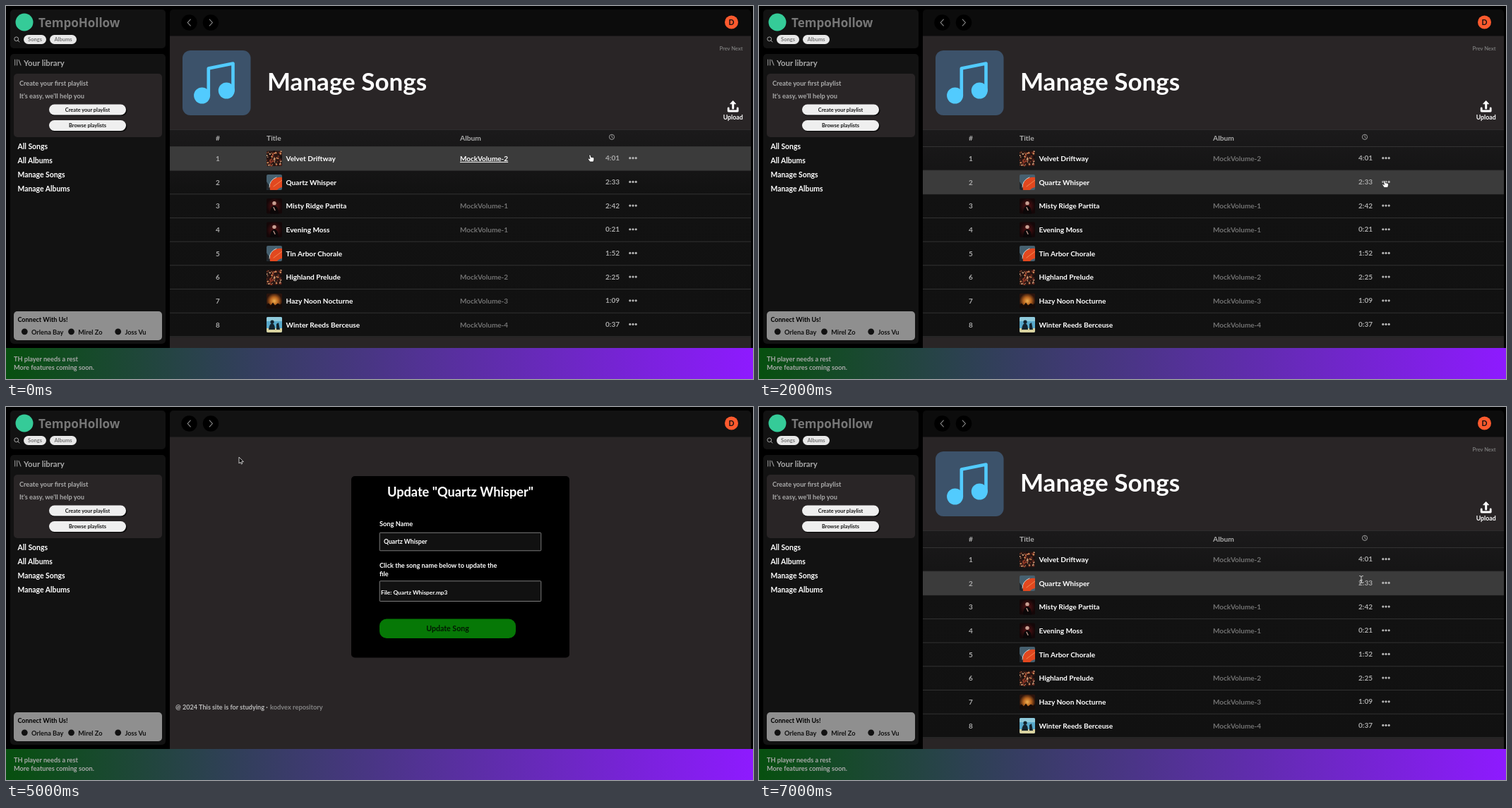
Animation of 1058x529 px, one loop 8000 ms. Source, as an HTML page:

```html
<!DOCTYPE html>
<html lang="en">
<head>
<meta charset="utf-8">
<title>Song manager demo</title>
<style>
  html, body { margin: 0; width: 100%; height: 100%; overflow: hidden; background: #000; }
  svg { display: block; width: 100%; height: 100%; font-family: Lato, "Open Sans", sans-serif; }
  .brand { font-family: "Open Sans", sans-serif; }
</style>
</head>
<body>
<svg viewBox="0 0 1058 529">
  <defs>
    <linearGradient id="bar"><stop stop-color="#07500f"/><stop offset="1" stop-color="#8e1aff"/></linearGradient>
    <linearGradient id="table" x2="0" y2="1"><stop stop-color="#1b1a1b"/><stop offset=".3" stop-color="#121212"/><stop offset="1" stop-color="#111"/></linearGradient>
    <radialGradient id="amber"><stop stop-color="#f0b04f"/><stop offset=".5" stop-color="#b8641f"/><stop offset="1" stop-color="#2c140c"/></radialGradient>
    <radialGradient id="stage"><stop stop-color="#5c1416"/><stop offset="1" stop-color="#140708"/></radialGradient>
    <clipPath id="thumb"><rect width="22" height="22" rx="2"/></clipPath>
  </defs>
  <g id="frame"></g>
  <g id="page"></g>
  <g id="pointer"></g>
</svg>
<script>
const get = id => document.getElementById(id);
const rect = (x, y, w, h, fill, r = 0, extra = '') =>
  `<rect x="${x}" y="${y}" width="${w}" height="${h}" rx="${r}" fill="${fill}" ${extra}/>`;
const circle = (x, y, r, fill, extra = '') => `<circle cx="${x}" cy="${y}" r="${r}" fill="${fill}" ${extra}/>`;
const line = (d, stroke, width = 1, fill = 'none') =>
  `<path d="${d}" stroke="${stroke}" stroke-width="${width}" fill="${fill}" stroke-linecap="round" stroke-linejoin="round"/>`;
const text = (x, y, s, size, fill = '#fff', anchor = 'start', extra = '') =>
  `<text x="${x}" y="${y}" font-size="${size}" font-weight="700" fill="${fill}" text-anchor="${anchor}" ${extra}>${s}</text>`;
const at = (x, y, body) => `<g transform="translate(${x} ${y})">${body}</g>`;

const songs = [
  ['Velvet Driftway', 2, '4:01', 'crowd'],
  ['Quartz Whisper', 0, '2:33', 'guitar'],
  ['Misty Ridge Partita', 1, '2:42', 'singer'],
  ['Evening Moss', 1, '0:21', 'singer'],
  ['Tin Arbor Chorale', 0, '1:52', 'guitar'],
  ['Highland Prelude', 2, '2:25', 'crowd'],
  ['Hazy Noon Nocturne', 3, '1:09', 'concert'],
  ['Winter Reeds Berceuse', 4, '0:37', 'sky']
];

function crowd() {
  let seed = 7, out = rect(0, 0, 22, 22, '#2a1613');
  const random = () => (seed = seed * 16807 % 2147483647) / 2147483647;
  const tones = ['#a8442a', '#c98355', '#6e2a20', '#d3a580', '#120c0c'];
  for (let i = 0; i < 80; i++)
    out += circle((random() * 22).toFixed(1), (random() * 22).toFixed(1), (0.6 + random() * 0.8).toFixed(1), tones[i % 5]);
  return out;
}
const thumbs = {
  crowd: crowd(),
  guitar: rect(0, 0, 22, 22, '#46606f') + '<path d="M0 10L8 22H0Z" fill="#20262b"/>' +
    '<path d="M5 22Q3 9 13 5Q18 3 22 4V18Q17 19 15 22Z" fill="#e2481f"/>' +
    line('M4 18Q4 8 14 4', '#d5cfc8') + line('M10 17L22 8', '#f28a52'),
  singer: rect(0, 0, 22, 22, 'url(#stage)') +
    '<path d="M5 22Q5 11 11 10Q17 11 17 22Z" fill="#0b0708"/>' + circle(11, 7, 2.7, '#c9a093') + line('M10 13L12 17', '#b99389', 1.3),
  concert: rect(0, 0, 22, 22, 'url(#amber)') +
    '<path d="M0 22V16L3 14L6 17L9 13L12 17L16 14L19 16L22 14V22Z" fill="#150b08"/>',
  sky: rect(0, 0, 22, 22, '#58a9cb') + rect(0, 0, 22, 6, '#8fcbdc') + rect(0, 16, 22, 6, '#d9d3a0') +
    circle(8, 7, 2.6, '#14242e') + '<path d="M3 18Q4 9 8 9Q12 10 12 18ZM14 18V10L17 8L19 18Z" fill="#14242e"/>'
};

const sideButton = (y, label) =>
  rect(61.5, y - 6.3, 110, 15, '#0a0a0a', 7.5) + rect(61, y - 7.5, 109, 15, '#efefef', 7.5) +
  text(115.5, y + 2.5, label, 7.4, '#151515', 'middle');

function drawFrame() {
  const menu = ['All Songs', 'All Albums', 'Manage Songs', 'Manage Albums'];
  const people = ['Orlena Bay', 'Mirel Zo', 'Joss Vu'];
  return rect(0, 0, 1058, 529, '#000') +
    rect(6, 5, 220, 55, '#121212', 5) + rect(6, 68, 220, 411, '#121212', 5) +
    circle(26, 23, 12.5, '#35cb98') +
    text(46, 29.7, 'TempoHollow', 17, '#777', 'start', 'class="brand"') +
    circle(14.7, 46.8, 2.9, 'none', 'stroke="#aaa"') + line('M16.9 49L19 51', '#aaa') +
    rect(25, 41, 32, 13, '#e8e8e8', 6.5) + text(41, 50, 'Songs', 7.5, '#777', 'middle') +
    rect(62, 41, 38, 13, '#e8e8e8', 6.5) + text(81, 50, 'Albums', 7.5, '#777', 'middle') +
    line('M12.7 76V84M15.7 76V84M18 76.5L21 84', '#999', 1.1) +
    text(25, 85, 'Your library', 11.3, '#aaa') +
    rect(11, 96, 210, 90, '#292526', 5) +
    text(19, 113, 'Create your first playlist', 9.2, '#aaa') +
    text(19, 130.5, "It's easy, we'll help you", 9.2, '#aaa') +
    sideButton(147, 'Create your playlist') + sideButton(169.5, 'Browse playlists') +
    menu.map((s, i) => text(16.5, 203 + i * 19.9, s, 10.4)).join('') +
    rect(11, 433, 210, 41, '#8f8f8f', 5) + text(16.5, 447.5, 'Connect With Us!', 9, '#000') +
    people.map((s, i) => circle(26.3 + i * 66.2, 461.8, 4.4, '#111') + text(36 + i * 66.2, 465.5, s, 9.2, '#111')).join('') +
    rect(0, 485, 1058, 44, 'url(#bar)') +
    text(11, 504, 'TH player needs a rest', 9.2, '#aaa') + text(11, 516, 'More features coming soon.', 9.2, '#aaa');
}

const topBar = (fill, backTone = '#999') =>
  rect(232, 5, 823, 60, fill, 5) +
  circle(259.5, 23.5, 11.2, '#000') + circle(290, 23.5, 11.2, '#000') +
  line('M261.3 19L257.2 23.5L261.3 28', backTone, 1.1) + line('M288.3 19L292.4 23.5L288.3 28', '#999', 1.1) +
  circle(1027.5, 23, 9.5, '#fd5a2e') + text(1027.5, 26.8, 'D', 10.5, '#111', 'middle') +
  rect(232, 42.5, 823, 442.5, '#292526');

function songRow([title, album, time, art], i, hover, underline, hideDots) {
  const y = 216.3 + i * 33.68, on = i === hover;
  const link = underline && on;
  return (on ? rect(232, y - 16.8, 823, 33.7, '#3b3b3b') : '') +
    rect(232, y + 16.4, 823, 0.8, '#3a3a3a') +
    text(300, y + 3.6, i + 1, 10, '#aaa', 'middle') +
    at(369, y - 11, `<g clip-path="url(#thumb)">${thumbs[art]}</g>`) +
    text(396.5, y + 3.6, title, 10.1) +
    (album ? text(643, y + 3.6, 'MockVolume-' + album, 10, link ? '#fff' : '#727272', 'start', link ? 'text-decoration="underline"' : '') : '') +
    text(869, y + 3, time, 10, '#aaa', 'end') +
    (hideDots ? '' : [883.8, 888, 892.2].map(x => circle(x, y - 0.6, 1.6, '#b5b5b5')).join(''));
}

const contextMenu = () =>
  rect(877.5, 243, 99.5, 82, '#333435', 2) +
  line('M888.2 261.2L894 255.4', '#fff', 3) + line('M887.3 262.3L889 261.8', '#fff', 1.2) +
  circle(891.3, 284, 4.4, '#fff') + line('M889.5 284H893', '#333', 1) + circle(898.6, 284, 1.2, '#fff') +
  rect(887, 305.3, 8, 8, '#fff', 1.5) + line('M889 309.3H893M891 307.3V311.3', '#333', 1.1) + circle(897.8, 309.3, 1.2, '#fff') +
  text(906.5, 261.5, 'Update', 9.4) + text(906.5, 287, 'Delete', 9.4) + text(906, 312.5, 'Add to Album', 9.2);

const songList = ({ hover, underline, menu }) =>
  topBar('#0c0c0c') +
  text(1043.5, 62.5, 'Prev Next', 7.5, '#777', 'end') +
  rect(250, 63, 96.5, 92, '#3c526a', 11) +
  line('M286.8 127V88.5L321.5 81.5V120', '#52cbfe', 4.6) +
  circle(277.6, 127, 11.5, '#52cbfe') + circle(312.3, 120, 11.5, '#52cbfe') +
  text(370, 120, 'Manage Songs', 35) +
  line('M1029.7 145V138', '#fff', 3) + line('M1026 138.5L1029.7 134.5L1033.4 138.5Z', '#fff', 1, '#fff') +
  line('M1023.2 145V149H1036.2V145', '#fff', 2.8) +
  text(1029.7, 161.3, 'Upload', 8.8, '#fff', 'middle') +
  rect(232, 175.5, 823, 294, 'url(#table)') +
  rect(232, 175.3, 823, 0.7, '#333') + rect(232, 199, 823, 0.8, '#3a3a3a') +
  text(300, 191, '#', 10.2, '#aaa', 'middle') + text(369, 190.8, 'Title', 10.3, '#aaa') + text(643, 190.8, 'Album', 10.3, '#aaa') +
  circle(858, 185.8, 3.6, 'none', 'stroke="#aaa" stroke-width=".9"') + line('M858 183.8V186L859.4 186.8', '#aaa', 0.8) +
  songs.map((s, i) => songRow(s, i, hover, underline, menu && i === 1)).join('') +
  (menu ? contextMenu() : '');

const field = (y, h) => rect(529.2, y, 228.6, h, '#111', 1, 'stroke="#8a8a8a" stroke-width=".9"');
const updateForm = ({ backTone }) => {
  const name = songs[1][0];
  return topBar('#121212', backTone) +
    rect(489, 98, 309, 257.5, '#000', 5) +
    text(643.5, 126.5, `Update "${name}"`, 18.2, '#fff', 'middle') +
    text(529, 168.8, 'Song Name', 9.25) + field(178.3, 25.5) + text(535, 194, name, 8.7) +
    text(529, 228, 'Click the song name below to update the', 9.2) + text(529, 240, 'file', 9.2) +
    field(246.8, 28.7) + text(531, 266.3, `File: ${name}.mp3`, 8.3) +
    rect(529, 300.5, 193, 27.5, '#067806', 10) + text(625.5, 318, 'Update Song', 10.6, '#021802', 'middle') +
    text(240, 428.5, '@ 2024 This site is for studying ·', 9.15, '#bbb') + text(374, 428.5, 'kodvex repository', 9.3, '#858585');
};

const pointers = {
  hand: line('M-2.6-4.6Q-1.5-5.6-.5-4.4L.2-1.6Q3.4-1.8 4.4-.4Q4.8 2.2 3.4 5H-1.4Q-3.2 2.6-4.4.8Q-4-.6-1.8.8Z', '#111', 0.7, '#fff'),
  arrow: line('M-1-4.5V4L1 2.2L2.4 5L3.7 4.4L2.5 1.7H5Z', '#ddd', 0.9, '#000'),
  beam: line('M-2.4-5Q0-5 0-3.6Q0-5 2.4-5M0-4V4.2M-2.4 5Q0 5 0 3.8Q0 5 2.4 5M-1.4 1H1.4', '#ccc', 1)
};

// One pose per second, each held until the next.
const poses = [
  { page: songList, hover: 0, underline: true, cursor: 'hand', x: 828.5, y: 216 },
  { page: songList, hover: 0, cursor: 'hand', x: 887, y: 219 },
  { page: songList, hover: 1, cursor: 'hand', x: 887, y: 252.5 },
  { page: songList, hover: 1, menu: true, cursor: 'hand', x: 922, y: 263.5 },
  { page: updateForm, cursor: 'arrow', x: 402.5, y: 124.5 },
  { page: updateForm, cursor: 'arrow', x: 331, y: 76 },
  { page: updateForm, backTone: '#666', cursor: 'hand', x: 261, y: 28.5 },
  { page: songList, hover: 1, cursor: 'beam', x: 853, y: 244.5 }
];

get('frame').innerHTML = drawFrame();
const start = performance.now();
let shown = -1;
function tick() {
  const step = Math.floor((performance.now() - start) / 1000) % poses.length;
  if (step !== shown) {
    const pose = poses[shown = step];
    get('page').innerHTML = pose.page(pose);
    get('pointer').innerHTML = at(pose.x, pose.y, pointers[pose.cursor]);
  }
  requestAnimationFrame(tick);
}
tick();
</script>
</body>
</html>
```
